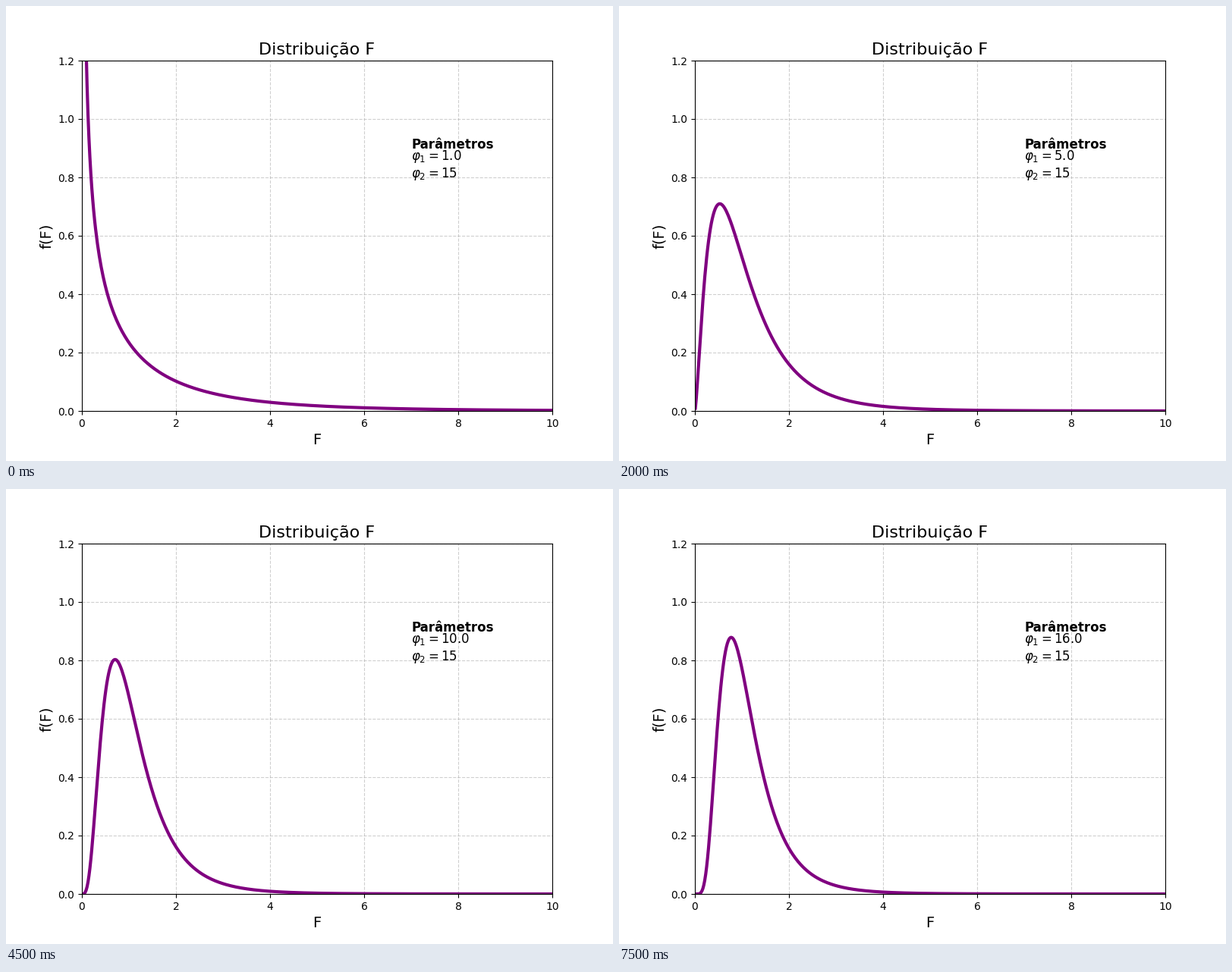
Animation of 800 by 600 pixels, one loop 8000 ms. Source, as a matplotlib script:

```python
from math import gamma

import matplotlib.pyplot as plt
import numpy as np
from matplotlib.animation import FuncAnimation

FRAMES = 16
INTERVAL = 500
D2 = 15

x = np.linspace(0.01, 10, 500)


def f_pdf(x, d1, d2):
    beta = gamma(d1 / 2) * gamma(d2 / 2) / gamma((d1 + d2) / 2)
    r = d1 / d2
    return r ** (d1 / 2) * x ** (d1 / 2 - 1) * (1 + r * x) ** (-(d1 + d2) / 2) / beta


plt.rcParams["font.family"] = "DejaVu Sans"
fig, ax = plt.subplots(figsize=(8, 6), dpi=100)
ax.set_xlim(0, 10)
ax.set_ylim(0, 1.2)
ax.set_title("Distribuição F", fontsize=16)
ax.set_xlabel("F", fontsize=14)
ax.set_ylabel("f(F)", fontsize=14)
ax.grid(True, linestyle="--", alpha=0.6)

curve, = ax.plot([], [], color="purple", lw=3)
ax.text(7, 0.9, "Parâmetros", fontsize=12, fontweight="bold")
label = ax.text(7, 0.86, "", fontsize=12)
ax.text(7, 0.8, rf"$\varphi_2 = {D2}$", fontsize=12)


def update(i):
    d1 = 1 + i
    curve.set_data(x, f_pdf(x, d1, D2))
    label.set_text(rf"$\varphi_1 = {d1:.1f}$")
    return curve, label


anim = FuncAnimation(fig, update, frames=FRAMES, interval=INTERVAL,
                     repeat=True, repeat_delay=0)
plt.show()
```
